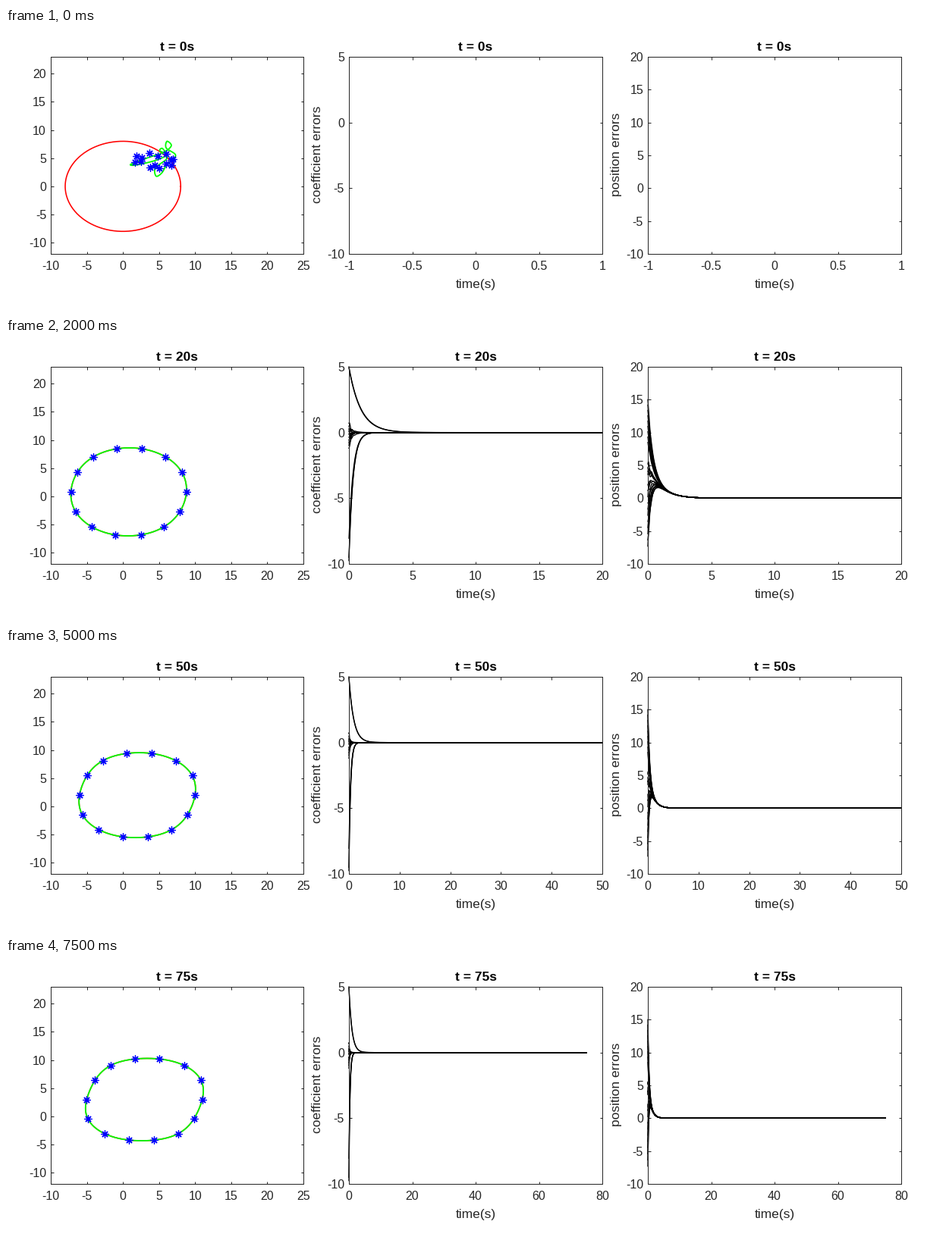
A matplotlib script for the animation above (8000 ms loop, 1239x372 px).

```python
import matplotlib.pyplot as plt
import numpy as np
from matplotlib.animation import FuncAnimation

W, H, DPI = 1239, 372, 128
PX = 72 / DPI
FRAMES, INTERVAL, STEP = 16, 500, 5
INK = "#262626"
TOP, BOTTOM, WIDTH = 38, 298, 333

plt.rcParams.update({
    "font.family": "Liberation Sans",
    "axes.unicode_minus": False,
    "axes.linewidth": PX,
    "axes.edgecolor": INK,
})

fig = plt.figure(figsize=(W / DPI, H / DPI), dpi=DPI, facecolor="white")


def label(x, y, text, **kw):
    kw = {"color": INK, "size": 17.4 * PX, "ha": "center", "va": "baseline", **kw}
    return fig.text(x / W, 1 - y / H, text, **kw)


def panel(left, width, ylim, yticks):
    ax = fig.add_axes([left / W, 1 - BOTTOM / H, width / W, (BOTTOM - TOP) / H])
    ax.set_ylim(ylim)
    ax.set_yticks(yticks)
    ax.tick_params(direction="in", top=True, right=True, length=3.5 * PX, width=PX,
                   color=INK, labelcolor=INK, labelsize=16 * PX)
    ax.tick_params(axis="x", pad=9 * PX)
    ax.tick_params(axis="y", pad=6 * PX)
    ax.xaxis.set_major_formatter(lambda v, _: f"{v:g}")
    ax.yaxis.set_major_formatter(lambda v, _: f"{v:g}")
    title = label(left + width / 2, 30, "", weight="bold", color="black")
    return ax, title


def error_panel(left, ylim, name, family):
    ax, title = panel(left, WIDTH + 1, ylim, range(ylim[0], ylim[1] + 1, 5))
    label(left + WIDTH / 2 + 1, 343, "time(s)")
    label(left - 37, 166.5, name, rotation=90, rotation_mode="anchor")
    lines = [ax.plot([], [], color="black", lw=1.3 * PX, clip_on=False)[0]
             for _ in family(np.zeros(1))]
    return ax, title, lines, family


# ---- closed curves -------------------------------------------------------

THETA = np.linspace(0, 2 * np.pi, 401)
ROBOT = np.arange(14)
ANGLE = ROBOT * 2 * np.pi / 14


def shape(th, t):
    """Circle of radius 8 that drifts and bulges linearly with time."""
    s, c = t / 75, 0.0397 * t
    s1, s3, s5 = (np.sin(n * th) for n in (1, 3, 5))
    c1, c5 = np.cos(th), np.cos(5 * th)
    dx = 0.52 * s1 + 0.21 * s3 + 0.08 * (s5 + c1 - c5)
    dy = -0.42 * s1 + 0.21 * s3 - 0.06 * s5
    return c + 8 * c1 + s * dx, c + 8 * s1 + s * dy


def start_ring():
    """Flat ring of robots in zigzag, pushed in at the lower left."""
    push = 1.2 * np.exp(-(ROBOT - 9) ** 2 / 2)
    zigzag = 0.3 * (-1.0) ** ROBOT
    return 4.25 + 2.7 * np.cos(ANGLE) + push, 4.55 + 1.1 * np.sin(ANGLE) + zigzag


def smooth_loop(pts, n=24):
    """Closed Catmull-Rom spline."""
    p = np.array(pts, float)
    a, b, c, d = (np.roll(p, k, axis=0)[:, None] for k in (1, 0, -1, -2))
    u = np.linspace(0, 1, n, endpoint=False)[None, :, None]
    q = 0.5 * (2 * b + (c - a) * u + (2 * a - 5 * b + 4 * c - d) * u**2
               + (3 * b - a - 3 * c + d) * u**3)
    q = q.reshape(-1, 2)
    return np.vstack([q, q[:1]]).T


TANGLE = smooth_loop([
    (1.1, 3.9), (3.5, 5.1), (5.6, 6.0), (6.7, 7.2), (6.1, 8.0), (6.0, 6.8),
    (7.3, 5.5), (6.1, 3.9), (5.4, 2.4), (4.6, 1.8), (4.5, 3.3), (6.1, 5.0),
    (5.5, 6.7), (5.1, 6.3), (6.1, 5.6), (4.5, 4.6), (1.9, 3.8),
])

# ---- error histories -----------------------------------------------------


def wiggle(t, amp, phase):
    return amp * (np.exp(-7 * t) * np.sin(24 * t + phase) - np.exp(-9 * t) * np.sin(phase))


def coefficient_errors(t):
    yield 5 * np.exp(-1.07 * t)
    yield 4.93 * np.exp(-1.09 * t)
    for start in (-9.75, -9.5, -8.05):
        yield start * np.exp((-2.3 + 0.08 * start) * t)
    for i, start in enumerate(np.linspace(0.7, -1.2, 10)):
        yield start * np.exp((-5.5 + 2.5 * np.sin(2 * i)) * t) + wiggle(t, 0.3, 1.7 * i)


def position_errors(t):
    common = 5.6 * np.exp(-1.07 * t)
    groups = np.linspace(15, 8.5, 9), np.linspace(5.2, 3.6, 4), np.linspace(2.1, -7.3, 11)
    for i, start in enumerate(np.concatenate(groups)):
        rate = 3.3 - 0.035 * start + 0.2 * np.sin(2.3 * i)
        amp = 0.9 if start < 6 else 0.3
        yield common + (start - 5.6) * np.exp(-rate * t) + wiggle(t, amp, 2.1 * i)


def time_axis(t_end):
    """Limits and tick step: at most six intervals."""
    if t_end == 0:
        return -1, 1, 0.5
    step = next(s for s in (1, 2, 5, 10, 20) if np.ceil(t_end / s) <= 6)
    return 0, step * np.ceil(t_end / step), step


# ---- scene ---------------------------------------------------------------

map_ax, map_title = panel(59, WIDTH, (-12, 23), range(-10, 21, 5))
map_ax.set_xlim(-10, 25)
map_ax.set_xticks(range(-10, 26, 5))
wanted, = map_ax.plot([], [], color="red", lw=1.6 * PX)
actual, = map_ax.plot([], [], color="lime", lw=1.8 * PX)
stars, = map_ax.plot([], [], ls="", marker=(8, 2, 0), ms=10 * PX,
                     mec="blue", mew=1.3 * PX)

plots = [error_panel(452, (-10, 5), "coefficient errors", coefficient_errors),
         error_panel(846, (-10, 20), "position errors", position_errors)]


def update(i):
    t_end = i * STEP
    for title in (map_title, *(p[1] for p in plots)):
        title.set_text(f"t = {t_end}s")

    wanted.set_data(*shape(THETA, t_end))
    actual.set_data(*(shape(THETA, t_end) if i else TANGLE))
    stars.set_data(*(shape(ANGLE, t_end) if i else start_ring()))

    lo, hi, step = time_axis(t_end)
    t = t_end * np.linspace(0, 1, 700) ** 3 if i else np.array([])
    for ax, _, lines, family in plots:
        ax.set_xlim(lo, hi)
        ax.set_xticks(np.arange(lo, hi + step / 2, step))
        for line, values in zip(lines, family(t)):
            line.set_data(t, values)
    return []


anim = FuncAnimation(fig, update, frames=FRAMES, interval=INTERVAL,
                     repeat=True, repeat_delay=0, blit=False)
plt.show()
```
